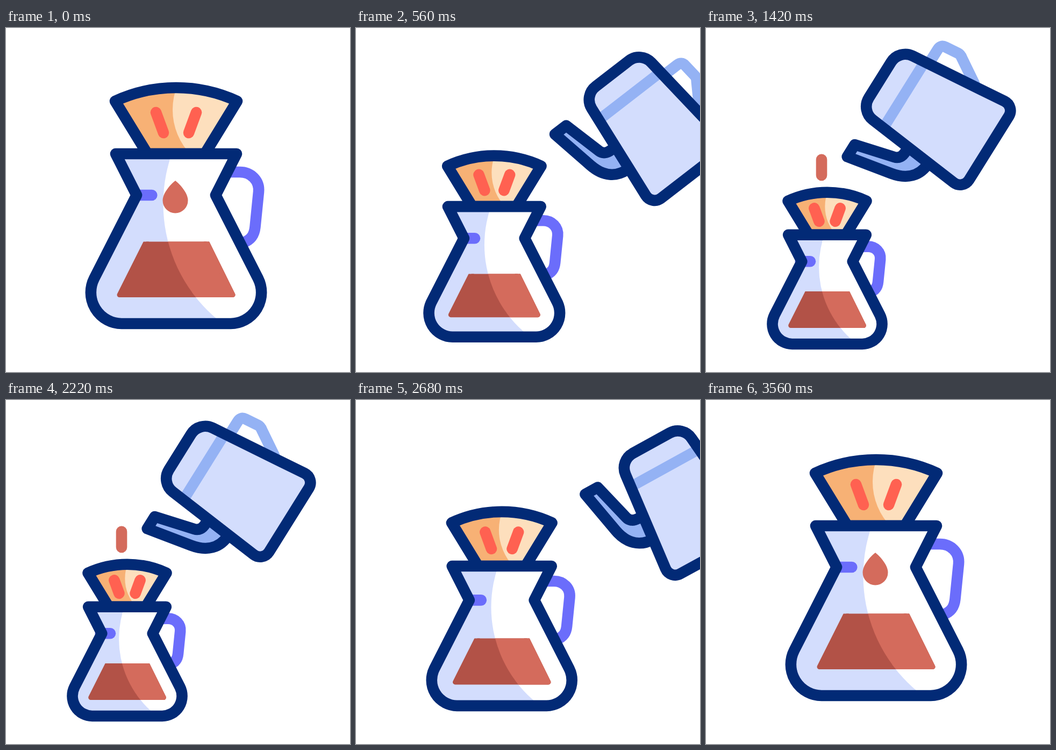
Write an HTML page that moves like this. It is 640 px wide and 640 px high and loops after 3600 ms.

```html
<!DOCTYPE html>
<html lang="en">
<head>
<meta charset="utf-8">
<title>Pour-over coffee</title>
<style>
  /* 0 = large carafe alone, 1 = small carafe under the tilted kettle */
  @property --p { syntax: "<number>"; inherits: true; initial-value: 0; }

  html, body { margin: 0; width: 100%; height: 100%; overflow: hidden; background: #fff; }
  svg {
    --line: 20.6px;
    display: block; width: 100vw; height: 100vh;
    fill: none; stroke-linecap: round; stroke-linejoin: round;
    animation: scene 3.6s infinite;
  }
  .carafe {
    --s: calc(1 - .357 * var(--p));
    stroke-width: calc(var(--line) / (var(--s)));
    transform-origin: 316.5px 550px;
    transform: translate(calc(-91px * var(--p)), calc(38px * var(--p))) scale(calc(var(--s)));
  }
  .kettle {
    stroke-width: var(--line);
    transform: translate(calc(904px - 440.4px * var(--p)), calc(179px - 110px * var(--p))) rotate(calc(-58deg * var(--p)));
  }
  .coffee { fill: currentColor; stroke: currentColor; stroke-width: calc(9px / (var(--s))); }
  .mark { transform: translateX(calc(-7px / (var(--s)))); }
  .ink { stroke: #022a76; }
  .violet { stroke: #6b6dfb; }
  .blue { stroke: #94b2f4; }
  .red { stroke: #ff6151; }
  .stream { stroke: #d46b5c; stroke-width: var(--line); animation: shown 3.6s step-end infinite; }
  .stream path { stroke-dasharray: 29 200; animation: pour .4s -.02s linear infinite; }
  .drop { fill: #d46b5c; animation: fall 3.6s linear infinite; }

  @keyframes scene {
    0%, 5.5556% { --p: 0; animation-timing-function: cubic-bezier(.333, 0, .667, 1); }
    22.2222%, 66.1111% { --p: 1; animation-timing-function: cubic-bezier(.333, 0, .667, 1); }
    82.7778%, 100% { --p: 0; }
  }
  @keyframes shown {
    0% { opacity: 0; }
    21.6667% { opacity: 1; }
    66.1111%, 100% { opacity: 0; }
  }
  @keyframes pour {
    from { stroke-dashoffset: 34px; }
    to { stroke-dashoffset: -141px; }
  }
  @keyframes fall {
    0%, 2.778% { transform: translateY(0); }
    8.333% { transform: translateY(113px); }
    8.334%, 82.222% { transform: translateY(-123px); }
    93.333% { transform: translateY(113px); }
    93.334% { transform: translateY(-123px); }
    98.889%, 100% { transform: translateY(0); }
  }
</style>
</head>
<body>
<svg viewBox="0 0 640 640">
  <defs>
    <path id="glass" d="M204 234H429L390 311 469 466A58 58 0 0 1 418 550H215A58 58 0 0 1 164 466L243 311Z"/>
    <path id="paper" d="M203 136A270 270 0 0 1 430 136L370 234H263Z"/>
    <path id="brew" d="M269.500 380H364.500L422 496.500H211Z"/>
    <path id="pot" d="M-34.600 -131H43.600A31 31 0 0 1 74.500 -103L93.600 86.600A19.500 19.500 0 0 1 74.300 108H-65.500A19.500 19.500 0 0 1 -84.900 86.600L-65.600 -103A31 31 0 0 1 -34.600 -131Z"/>
    <circle id="light" cx="572.5" cy="327" r="280"/>
    <clipPath id="inGlass"><use href="#glass"/></clipPath>
    <clipPath id="inPaper"><use href="#paper"/></clipPath>
    <clipPath id="inPot"><use href="#pot"/></clipPath>
    <clipPath id="inLight"><use href="#light"/></clipPath>
    <clipPath id="level"><rect x="190" y="397.4" width="250" height="120"/></clipPath>
    <clipPath id="neck"><rect x="285" y="223" width="60" height="174"/></clipPath>
  </defs>

  <g class="carafe">
    <path class="violet" d="M412 268H435C456 268 472 284 470 305L463.500 370C462 385 456 394 442 399"/>

    <use href="#paper" fill="#f7b175"/>
    <circle cx="430" cy="152" r="120" fill="#fddfbd" clip-path="url(#inPaper)"/>
    <path class="red" d="M279 157L293 195M354 157L340 195"/>
    <use href="#paper" class="ink"/>

    <use href="#glass" fill="#d3ddfd"/>
    <g clip-path="url(#inGlass)"><use href="#light" fill="#fff"/></g>
    <path class="violet mark" d="M250 311H278.300"/>
    <g clip-path="url(#level)">
      <use href="#brew" class="coffee" color="#b25247"/>
      <g clip-path="url(#inLight)"><use href="#brew" class="coffee" color="#d46b5c"/></g>
    </g>
    <use href="#glass" class="ink"/>

    <g clip-path="url(#neck)">
      <path class="drop" d="M315 284C324 291 338.500 307 338.500 321A23.500 23.500 0 0 1 291.500 321C291.500 307 306 291 315 284Z"/>
    </g>
  </g>

  <g class="kettle">
    <g transform="translate(-102 27)">
      <path class="blue" d="M78 -70H109.500Q120 -70 121 -60L123.500 -34Q124 -29 119.500 -23L92 21"/>
      <path class="ink" fill="#94b2f4" d="M-74 -20H-84C-94 -20 -101 -24 -103 -32L-122.500 -107H-149L-132 -21C-126 9 -108 27.500 -78 27.500Z"/>
      <use href="#pot" fill="#d3ddfd"/>
      <rect x="-100" y="-88.300" width="200" height="20" fill="#94b2f4" clip-path="url(#inPot)"/>
      <use href="#pot" class="ink"/>
    </g>
  </g>

  <g class="stream"><path d="M270 218H242Q215 218 215 245V316"/></g>
</svg>
</body>
</html>
```
